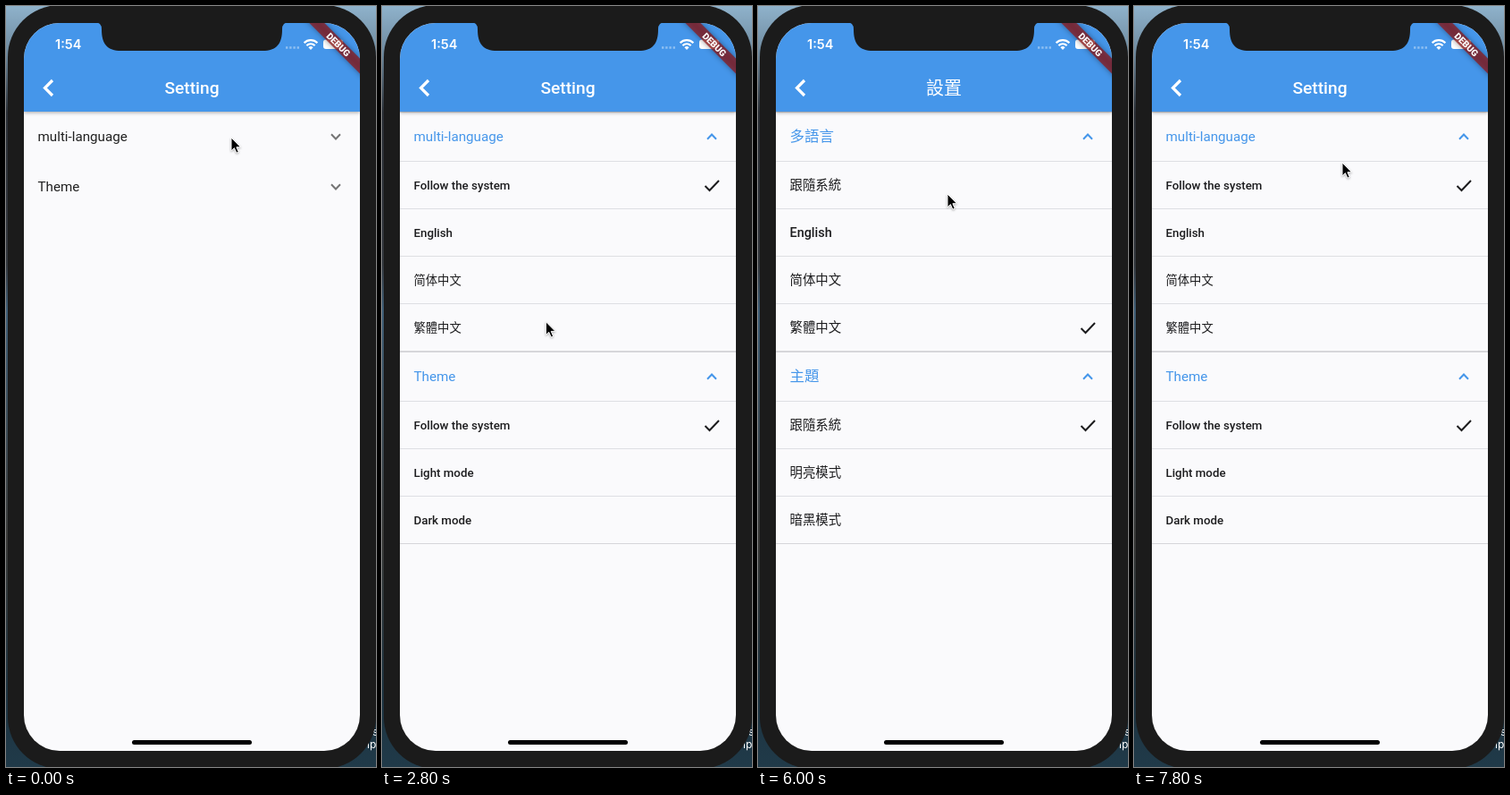
An HTML page for the animation above (8 s loop, 414x850 px).

```html
<!DOCTYPE html>
<html lang="en">
<head>
<meta charset="utf-8">
<title>Settings screen</title>
<style>
  html, body { margin: 0; width: 100%; height: 100%; overflow: hidden; }
  body { position: relative; background: #22303b; --blue: #4596ea;
    font-family: Roboto, "Noto Sans CJK SC", "Noto Sans CJK TC", "Noto Sans CJK", sans-serif; }
  svg { position: absolute; left: 0; top: 0; overflow: visible; }
  .screen { position: absolute; left: 20px; top: 19px; width: 376px; height: 813px;
    border-radius: 40px; overflow: hidden; background: #fafafc; }
  .bar { position: absolute; inset: 0 0 auto; height: 99px; background: var(--blue);
    box-shadow: 0 1px 4px rgba(0, 0, 0, .35); }
  .title { position: absolute; inset: 58px 0 auto; line-height: 30px; text-align: center;
    color: #fff; font-weight: 500; }
  .clock { position: absolute; left: 35px; top: 14px; line-height: 20px; color: #fff;
    font: 600 14.5px/20px Inter, sans-serif; }
  .list { position: absolute; top: 98px; left: 0; width: 376px; }
  .section { position: relative; }
  .section::before, .section::after { content: ""; position: absolute; left: 0; right: 0; height: 1px;
    background: #d6d6da; opacity: var(--open); }
  .section::before { top: 1px; }
  .section::after { top: 100%; }
  .row { position: relative; overflow: hidden; box-sizing: border-box; padding-left: 15.5px; white-space: nowrap; }
  .row span { position: relative; }
  .head { height: 56px; line-height: 58px; font-size: calc(16px * var(--scale)); }
  .item { height: 53px; line-height: 53px; border-top: 1px solid #dedfe3; color: #1c1c1e;
    font-size: calc(14px * var(--scale)); font-weight: 500; }
  .body { overflow: hidden; }
  .ink { position: absolute; border-radius: 50%; transform: translate(-50%, -50%); }
  .line { fill: none; stroke-width: 2; }
</style>
</head>
<body>
<svg width="414" height="850">
  <defs>
    <linearGradient id="desk" x2="0" y2="1">
      <stop offset="0" stop-color="#8fb2cb"/>
      <stop offset=".06" stop-color="#6f8ba0"/>
      <stop offset=".14" stop-color="#2a2f36"/>
      <stop offset=".34" stop-color="#34383e"/>
      <stop offset=".4" stop-color="#3f5f78"/>
      <stop offset=".7" stop-color="#3a3a38"/>
      <stop offset=".9" stop-color="#1d3340"/>
      <stop offset="1" stop-color="#203a49"/>
    </linearGradient>
  </defs>
  <rect width="414" height="850" fill="url(#desk)"/>
  <g fill="#fff" font-family="Inter, sans-serif" font-size="12">
    <text x="410" y="815">s</text><text x="404" y="829">ip</text>
  </g>
  <rect x="2" y="-1" width="412" height="853" rx="58" fill="#1b1b1b"/>
</svg>

<div class="screen">
  <div class="list"></div>
  <div class="bar"></div>
  <div class="title"></div>
  <div class="clock">1:54</div>
</div>

<svg width="414" height="850">
  <clipPath id="glass"><rect x="20" y="19" width="376" height="813" rx="40"/></clipPath>
  <path d="M99 18Q107 18 107 26C107 42 113 50 129 50H287C303 50 309 42 309 26Q309 18 317 18Z" fill="#1b1b1b"/>
  <path d="M52 83 43.5 91.5 52 100" fill="none" stroke="#fff" stroke-width="3.2"/>
  <g fill="#fff">
    <path d="M313 46.5H328" stroke="#fff" stroke-opacity=".4" stroke-width="2.4" stroke-dasharray="2.4 1.8"/>
    <g fill="none" stroke="#fff" stroke-width="2.2">
      <path d="M333.6 41.2a10.4 10.4 0 0 1 14.8 0M336.4 44.2a6.4 6.4 0 0 1 9.2 0"/>
    </g>
    <path d="M341 49 338.4 46.3a3.7 3.7 0 0 1 5.2 0Z"/>
    <rect x="355" y="37.5" width="22" height="10.5" rx="3"/>
  </g>
  <g clip-path="url(#glass)">
    <g transform="translate(396 19) rotate(45)">
      <rect x="-60" y="28" width="120" height="12" fill="#b71c1c" fill-opacity=".63"
        style="filter:drop-shadow(0 0 3px rgba(0,0,0,.6))"/>
      <rect x="-60" y="28" width="120" height="12" fill="#300" fill-opacity=".2"/>
      <text y="37.7" text-anchor="middle" fill="#fff" font-family="Roboto, sans-serif" font-weight="900" font-size="10.2">DEBUG</text>
    </g>
  </g>
  <rect x="141" y="820" width="134" height="5" rx="2.5"/>
  <path id="cursor" d="M0 0V14.8L3.4 11.6 5.9 17.2 8.3 16.2 5.9 10.7H10.6Z" stroke="#fff" stroke-width="1"
    style="filter:drop-shadow(0 1px 1px rgba(0,0,0,.3))"/>
</svg>

<script>
const LOOP = 8000, TICK = 200;

const english = { title: "Setting", heads: ["multi-language", "Theme"], system: "Follow the system",
  modes: ["Light mode", "Dark mode"], titleSize: 19.2 };
const simplified = { title: "设置", heads: ["多语言", "主题"], system: "跟随系统",
  modes: ["明亮模式", "暗黑模式"], titleSize: 20 };
const traditional = { title: "設置", heads: ["多語言", "主題"], system: "跟隨系統",
  modes: ["明亮模式", "暗黑模式"], titleSize: 20 };

// Chosen language over time: start, strings, checked row, text scale
const choices = [
  [0, english, 0, .95], [3400, simplified, 2, .985], [4400, traditional, 3, 1.03],
  [6600, english, 1, .985], [7400, english, 0, .95]
];

// Taps: start, section, row (-1 is the header), x, y in the row, final radius, final opacity
const taps = [
  [600, 0, -1, 231, 31, 150, .04], [1600, 1, -1, 153, 22, 183, .02],
  [3400, 0, 2, 174.5, 21, 108, .07], [4400, 0, 3, 161, 18, 110, .06],
  [6600, 0, 1, 178, 9, 138, .045], [7400, 0, 0, 205, 24, 140, .045]
];

// Pointer path: time, x, y
const path = [
  [0, 252, 147], [600, 251, 148], [1000, 240, 170], [1600, 173, 407], [2000, 173, 407],
  [2600, 178, 380], [3200, 194, 298], [3600, 194, 294], [4200, 181, 350], [4400, 181, 349],
  [4600, 184, 340], [4800, 208, 256], [5600, 212, 211], [6000, 212, 210], [6400, 206, 230],
  [6800, 206, 228], [7000, 210, 222], [7400, 226, 196], [7800, 233, 175], [8000, 233, 175]
];

const $ = s => document.querySelector(s);
const add = (parent, tag, cls, html = "") => {
  const el = parent.appendChild(document.createElement(tag));
  el.className = cls;
  el.innerHTML = html;
  return el;
};
const icon = d => `<svg width="1" height="1" class="icon"><path class="line" d="${d}"/></svg>`;

function makeRow(parent, cls, shape) {
  const el = add(parent, "div", "row " + cls);
  const ink = add(el, "div", "ink");
  const label = add(el, "span", "");
  el.insertAdjacentHTML("beforeend", icon(shape));
  return { el, ink, label, mark: el.querySelector("path") };
}

const sections = [4, 3].map(count => {
  const el = add($(".list"), "div", "section");
  const head = makeRow(el, "head", "M-5-2.7 0 2.5 5-2.7");
  const body = add(el, "div", "body");
  const inner = add(body, "div", "");
  const items = Array.from({ length: count }, () => {
    const row = makeRow(inner, "item", "M341.5 27 346.5 32 357 21");
    row.mark.style.stroke = "#1c1c1e";
    return row;
  });
  return { el, head, body, inner, items };
});

const openness = (t, start) => t < start ? 0 : t < start + TICK ? .865 : 1;
const blend = (p, from) => `color-mix(in srgb, #4596ea ${p * 100}%, ${from})`;

function pointerAt(t) {
  const i = path.findIndex(p => p[0] > t);
  const [t0, x0, y0] = path[i - 1], [t1, x1, y1] = path[i];
  const k = (t - t0) / (t1 - t0);
  return [x0 + (x1 - x0) * k, y0 + (y1 - y0) * k];
}

function setOpen({ el, head, body, inner, items }, f) {
  const full = items.length * 53;
  el.style.setProperty("--open", f);
  body.style.height = full * f + "px";
  inner.style.transform = `translateY(${-full * (1 - f) / 2}px)`;
  head.label.style.color = blend(f ** 8, "#212121");
  head.mark.style.stroke = blend(f ** 2, "#757575");
  head.mark.setAttribute("transform", `translate(349 29) rotate(${180 * f})`);
}

function setLanguage([, text, checked, scale]) {
  $(".title").textContent = text.title;
  $(".title").style.fontSize = text.titleSize + "px";
  $(".list").style.setProperty("--scale", scale);
  const labels = [[text.system, "English", "简体中文", "繁體中文"], [text.system, ...text.modes]];
  sections.forEach(({ head, items }, s) => {
    head.label.textContent = text.heads[s];
    items.forEach((row, i) => {
      row.label.textContent = labels[s][i];
      row.mark.style.visibility = i === (s ? 0 : checked) ? "visible" : "hidden";
    });
  });
}

function setInk(t) {
  for (const { head, items } of sections)
    for (const row of [head, ...items]) {
      row.el.style.backgroundColor = "";
      row.ink.style.display = "none";
    }
  for (const [start, s, i, x, y, radius, alpha] of taps) {
    const age = t - start;
    if (age < 0 || age >= 2 * TICK) continue;
    const pressed = age < TICK;
    const row = i < 0 ? sections[s].head : sections[s].items[i];
    const size = 2 * (pressed ? 50 : radius) + "px";
    row.el.style.backgroundColor = `rgba(0,0,0,${pressed ? .045 : .01})`;
    Object.assign(row.ink.style, { display: "block", left: x + "px", top: y + "px", width: size, height: size,
      background: `rgba(0,0,0,${pressed ? .11 : alpha})` });
  }
}

function render(t) {
  setOpen(sections[0], openness(t, 800));
  setOpen(sections[1], openness(t, 1800));
  setLanguage(choices.findLast(c => c[0] <= t));
  setInk(t);
  $("#cursor").setAttribute("transform", `translate(${pointerAt(t)})`);
}

let shown = -1;
function frame() {
  const t = Math.floor(performance.now() % LOOP / TICK) * TICK;
  if (t !== shown) render(shown = t);
  requestAnimationFrame(frame);
}
frame();
</script>
</body>
</html>
```
